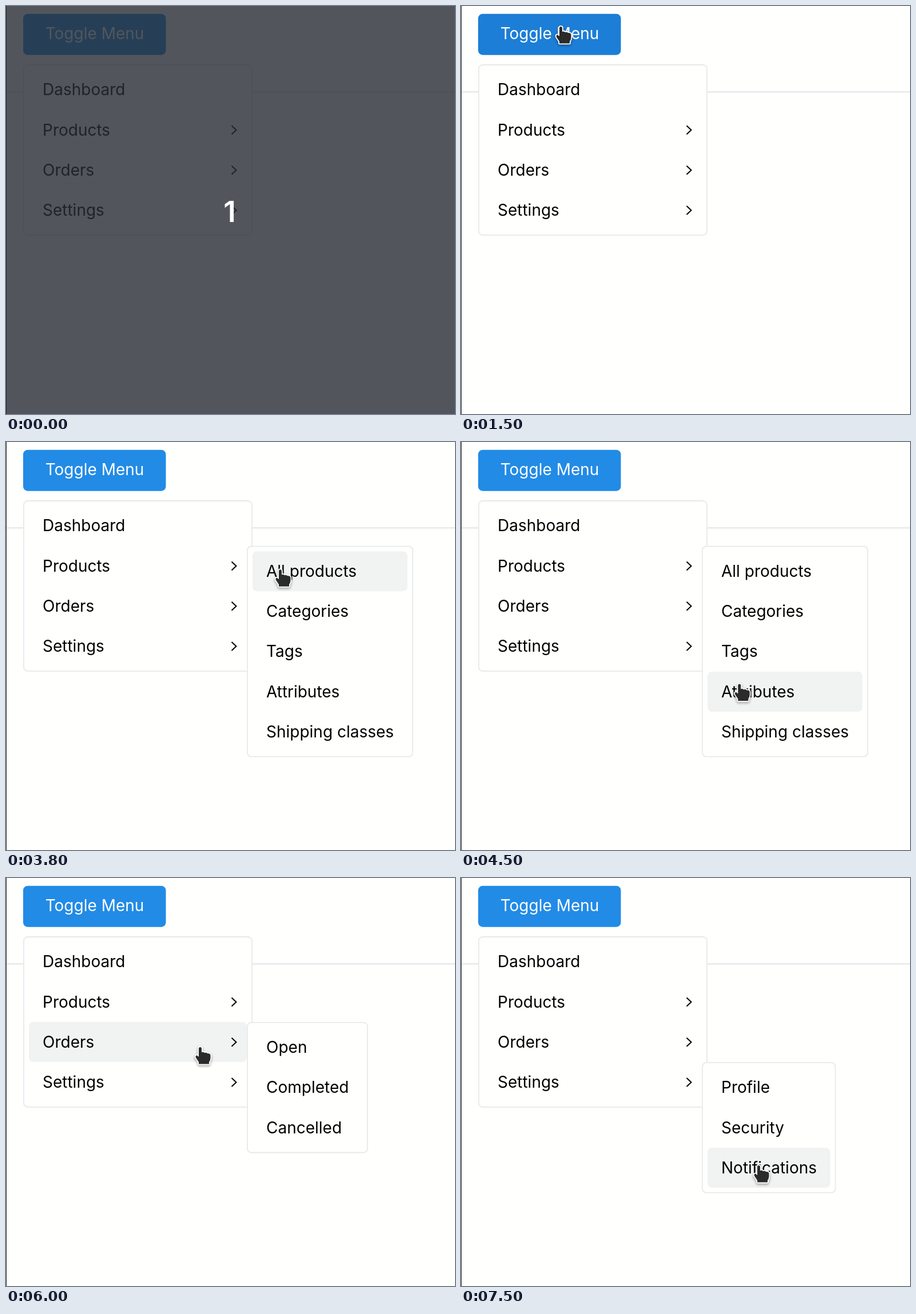
These frames come from a looping animation (785x714 px, 8 s). An HTML page with a canvas:

```html
<!DOCTYPE html>
<html lang="en">
<head>
<meta charset="utf-8">
<style>
  html, body { margin: 0; width: 100%; height: 100%; overflow: hidden; background: #fffffe; }
  canvas { display: block; width: 785px; height: 714px; }
</style>
</head>
<body>
<canvas id="stage" width="785" height="714"></canvas>
<script>
const ctx = document.getElementById('stage').getContext('2d');
const LOOP = 8000, STEP = 100, ROW = 70.2, PAD = 9.5;
const PAGE = '#fffffe', INK = '#000';

const makeMenu = (x, y, w, items) => ({ x, y, w, h: items.length * ROW + 2 * PAD, items });
const rowTop = (menu, row) => menu.y + PAD + row * ROW;

const button = { x: 30, y: 13.7, w: 249.5, h: 72 };
const main = makeMenu(30, 102, 401, ['Dashboard', 'Products', 'Orders', 'Settings']);
const submenu = (row, w, ...items) => makeMenu(421, rowTop(main, row), w, items);
const subs = [
  null,
  submenu(1, 291, 'All products', 'Categories', 'Tags', 'Attributes', 'Shipping classes'),
  submenu(2, 212, 'Open', 'Completed', 'Cancelled'),
  submenu(3, 234.5, 'Profile', 'Security', 'Notifications')
];

// Pointer legs: start and end time, then the fingertip's goal
const aim = (menu, row, dx, dy = 0) => [menu.x + dx, rowTop(menu, row) + ROW / 2 + dy];
const entry = [188, 15];
const legs = [
  [800, 1000, [177, 36]],
  [1500, 2000, aim(main, 0, 153)],
  [2600, 3800, aim(subs[1], 0, 61, -3)],
  [3800, 4400, aim(subs[1], 3, 73, -6)],
  [4400, 5100, aim(main, 2, 379, 9)],
  [5100, 5340, aim(main, 2, 312, 9)],
  [6000, 6300, aim(main, 3, 350, -11)],
  [6600, 7500, aim(subs[3], 2, 102, -4)]
];

const hand = new Path2D('M-5 17V2.500Q-5 0 -2.500 0Q0 0 0 2.500V9Q3.500 7.500 5 10Q8.500 8.500 10 11' +
  'Q15 10.500 15.500 14V19Q15.500 23 13 26V29.500H-5V26Q-8 22 -10.500 17.500Q-10.500 14 -8 14.500Z');

function pointer(t) {
  if (t < legs[0][0]) return null;
  return legs.reduce((pos, [start, end, goal]) => {
    const k = Math.min(1, Math.max(0, (t - start) / (end - start)));
    const ease = k * k * (3 - 2 * k);
    return pos.map((v, i) => v + (goal[i] - v) * ease);
  }, entry);
}

const inside = (p, { x, y, w, h }) => p && p[0] >= x && p[0] < x + w && p[1] >= y && p[1] < y + h;
const rowBox = (menu, row) => ({ x: menu.x + 10, y: rowTop(menu, row), w: menu.w - 20, h: ROW });
const hoveredRow = (menu, p) => menu.items.findIndex((_, row) => inside(p, rowBox(menu, row)));

// The open submenu follows the last row touched in the main menu
function openSub(t) {
  let open = 0;
  for (let s = 0; s <= t; s += STEP) {
    const p = pointer(s);
    if (open && inside(p, subs[open])) continue;
    const row = hoveredRow(main, p);
    if (row >= 0) open = row;
  }
  return open;
}

function box({ x, y, w, h }, fill, radius = 0, stroke) {
  ctx.beginPath();
  ctx.roundRect(x, y, w, h, radius);
  ctx.fillStyle = fill;
  ctx.fill();
  if (!stroke) return;
  ctx.strokeStyle = stroke;
  ctx.lineWidth = 1.8;
  ctx.stroke();
}

function label(text, x, y, color, align = 'left', font = '28px') {
  ctx.font = font + ' Inter, sans-serif';
  ctx.textAlign = align;
  ctx.fillStyle = color;
  ctx.fillText(text, x, y);
}

function chevron(x, y) {
  ctx.beginPath();
  ctx.moveTo(x, y - 7.5);
  ctx.lineTo(x + 8, y);
  ctx.lineTo(x, y + 7.5);
  ctx.strokeStyle = INK;
  ctx.lineWidth = 2;
  ctx.stroke();
}

function drawMenu(menu, p) {
  const { x, y, w, h, items } = menu;
  box({ x: x + 1, y: y + 1, w: w - 2, h: h - 2 }, PAGE, 7, '#e8e9ea');
  const hovered = hoveredRow(menu, p);
  items.forEach((text, row) => {
    const top = rowTop(menu, row);
    if (row === hovered) box(rowBox(menu, row), '#f1f3f3', 8);
    label(text, x + 34, Math.round(top + 44.8), INK);
    if (menu === main && row) chevron(394.5, top + 35.3);
  });
}

function drawPointer([x, y]) {
  ctx.save();
  ctx.translate(x, y);
  ctx.lineJoin = 'round';
  ctx.shadowColor = 'rgba(0,0,0,.4)';
  ctx.shadowBlur = 4;
  ctx.shadowOffsetY = 2;
  ctx.strokeStyle = '#fff';
  ctx.lineWidth = 3.6;
  ctx.stroke(hand);
  ctx.shadowColor = 'transparent';
  ctx.fillStyle = '#2b2b2b';
  ctx.fill(hand);
  ctx.restore();
}

function draw(t) {
  const p = pointer(t), sub = subs[openSub(t)];
  const stage = { x: 0, y: 0, w: 785, h: 714 };
  box(stage, PAGE);
  box({ x: 0, y: 149.5, w: 785, h: 1.8 }, '#dee2e6');
  box(button, inside(p, button) ? '#1c7ed6' : '#228be6', 8);
  label('Toggle Menu', 155, 58, '#fff', 'center');

  drawMenu(main, sub && inside(p, sub) ? null : p);
  if (sub) drawMenu(sub, p);
  if (p) drawPointer(p);

  if (t < 100) {
    box(stage, 'rgba(39,44,52,.8)');
    label('1', 391, 377.5, '#fff', 'center', '600 51px');
  }
  box({ ...stage, w: 1 }, '#222');
}

function frame() {
  const t = performance.now() % LOOP;
  draw(Math.floor(t / STEP) * STEP);
  requestAnimationFrame(frame);
}
frame();
</script>
</body>
</html>
```
